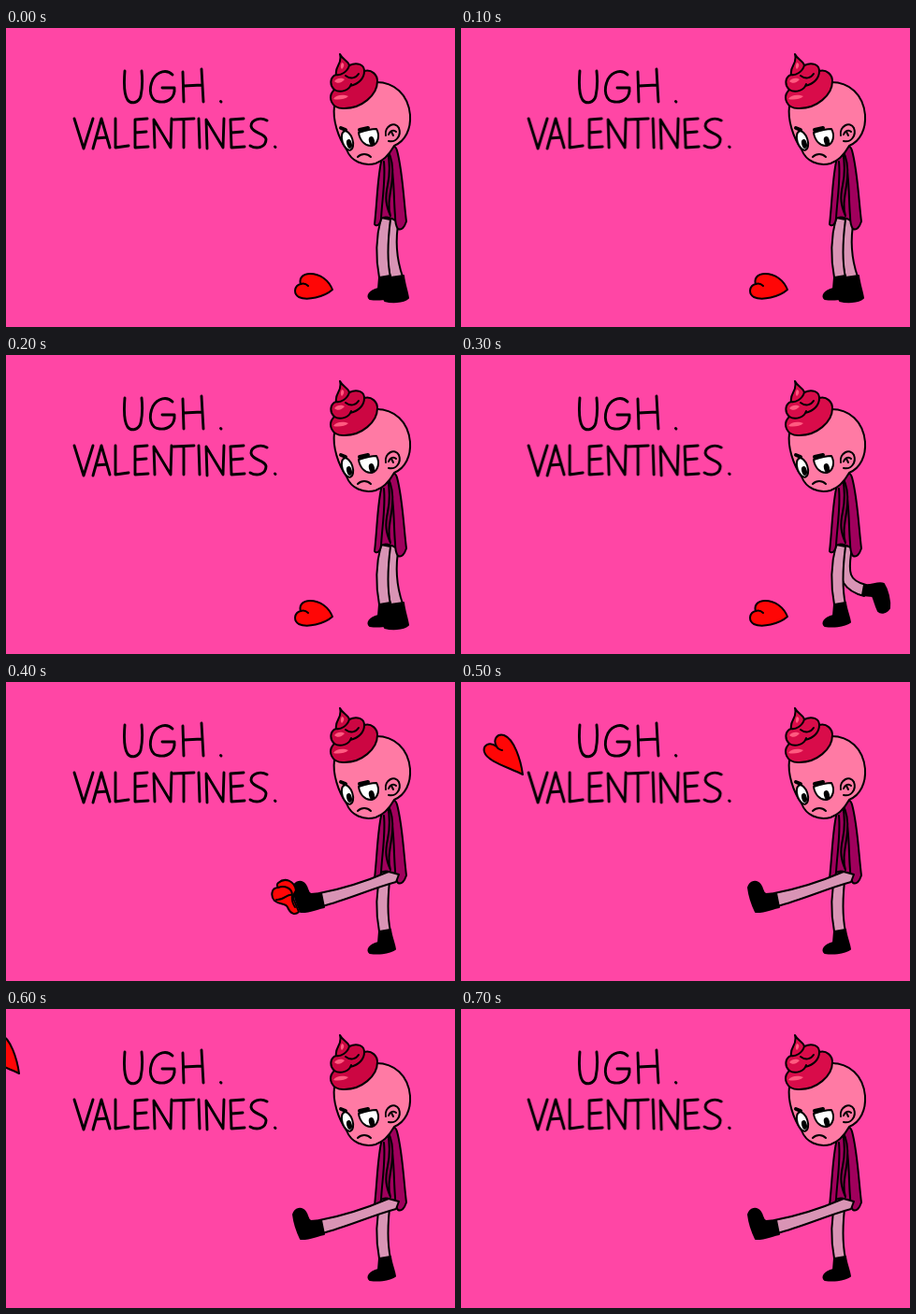
An HTML page that plays this animation: 480x320 px, repeating every 0.8 s.

```html
<!DOCTYPE html>
<html lang="en">
<head>
<meta charset="utf-8">
<title>Ugh. Valentines.</title>
<style>
html, body { margin: 0; width: 100%; height: 100%; overflow: hidden; background: #ff46a5; }
svg { display: block; width: 100vw; height: 100vh; }
path, ellipse { stroke: #000; stroke-width: 2; stroke-linecap: round; stroke-linejoin: round; }
.line { fill: none; }
.ink { fill: #000; }
.letters path { fill: none; stroke-width: 2.9; }
.skin { fill: #ff7aa4; }
.top { fill: #a0005c; }
.shade { fill: #82004a; }
.leg { fill: #d994b5; }
.heart { fill: #ff0606; }
.brow { fill: none; stroke-width: 4; }
.shine { fill: #ff5a80; stroke: none; }
.hair { fill: #cc0642; }

/* the drawing boils between two line variants */
#scene { filter: url(#boilA); animation: boil .2s step-end infinite; }
#word { animation: nudge .2s step-end infinite; }
.hair { animation: tint .2s step-end infinite; }
@keyframes boil { 50% { filter: url(#boilB); } }
@keyframes nudge { 50% { transform: translate(-.8px, 0); } }
@keyframes tint { 50% { fill: #d90c4a; } }

/* one kick: stand, swing back, strike, heart flies off */
.pose { animation: .8s step-end infinite; }
#stand { animation-name: stand; }
#swing { animation-name: swing; }
.kick { animation-name: kick; }
#rest { animation-name: rest; }
#hit { animation-name: hit; }
#fly { animation-name: fly; }
@keyframes stand { 0% { visibility: visible; } 37.5%, 100% { visibility: hidden; } }
@keyframes swing { 0%, 50%, 100% { visibility: hidden; } 37.5% { visibility: visible; } }
@keyframes kick { 0% { visibility: hidden; } 50%, 100% { visibility: visible; } }
@keyframes rest { 0% { visibility: visible; } 50%, 100% { visibility: hidden; } }
@keyframes hit { 0%, 62.5%, 100% { visibility: hidden; } 50% { visibility: visible; } }
@keyframes fly {
  0%, 87.5%, 100% { visibility: hidden; transform: none; }
  62.5% { visibility: visible; transform: none; }
  75% { visibility: visible; transform: translate(-52px, -30px); }
}
</style>
</head>
<body>
<svg viewBox="0 0 480 320" role="img" aria-label="Ugh. Valentines.">
  <defs>
    <filter id="boilA" filterUnits="userSpaceOnUse" x="0" y="0" width="480" height="320" color-interpolation-filters="sRGB">
      <feTurbulence type="fractalNoise" baseFrequency=".06" seed="3"/>
      <feDisplacementMap in="SourceGraphic" scale="1.2" xChannelSelector="R" yChannelSelector="G"/>
    </filter>
    <filter id="boilB" filterUnits="userSpaceOnUse" x="0" y="0" width="480" height="320" color-interpolation-filters="sRGB">
      <feTurbulence type="fractalNoise" baseFrequency=".06" seed="11"/>
      <feDisplacementMap in="SourceGraphic" scale="1.2" xChannelSelector="R" yChannelSelector="G"/>
    </filter>
    <g id="plant">
      <path class="leg" d="M401 203C396 222 395 246 399 267L411 267C407 248 408 228 411 205Z"/>
      <path class="ink" d="M399 267L411 265C412 273 415 279 416 286C409 291 396 291 389 290C385 287 389 281 398 279Z"/>
    </g>
  </defs>

  <rect width="480" height="320" fill="#ff46a5"/>

  <g id="scene">
    <g class="letters">
      <path d="M127 46C126 58 126 71 130 77C134 82 142 80 144 73C146 64 146 55 145 46"/>
      <path d="M178 50C172 44 162 46 157 55C152 66 154 78 164 79C174 80 181 74 180 64L167 64"/>
      <path d="M189 47L190 79M209 44L211 79M190 62L209 61"/>
      <path d="M229.5 78.5L230 79"/>
      <g id="word">
        <path d="M73 97L83 129L93 97"/>
        <path d="M93 129L102 97L111 128M96 118L108 117"/>
        <path d="M117 97L117 128L131 126"/>
        <path d="M151 97L138 98L138 128L152 127M138 112L150 111"/>
        <path d="M159 128L158 98L176 128L177 97"/>
        <path d="M179 98L201 97M190 98L190 128"/>
        <path d="M206 97L207 128"/>
        <path d="M215 129L214 98L232 128L233 97"/>
        <path d="M254 97L240 98L241 128L255 127M241 112L253 111"/>
        <path d="M279 99C272 95 262 98 262 105C263 113 277 112 278 119C278 128 268 130 261 126"/>
        <path d="M287.5 127L288 127.5"/>
      </g>
    </g>

    <g id="rest" class="pose">
      <path class="heart" d="M349 280C345 270 336 263 325 263C317 263 313 268 315 274C308 276 307 284 313 288C322 292 340 288 349 280Z"/>
      <path class="line" d="M315 274C318 273 321 274 323 276"/>
    </g>

    <g id="stand" class="pose">
      <path class="leg" d="M409 203C405 225 406 246 411 268L424 266C417 246 416 226 420 205Z"/>
      <use href="#plant"/>
      <path class="ink" d="M411 267L425 265C426 274 429 282 430 289C424 294 412 294 405 292C402 288 406 283 412 280Z"/>
    </g>

    <g id="swing" class="pose">
      <path class="leg" d="M407 204C405 220 404 234 409 244C414 252 423 256 431 258L433 246C425 244 419 241 417 235C414 226 417 215 418 205Z"/>
      <use href="#plant"/>
      <path class="ink" d="M431 246C438 248 446 242 452 245C456 251 459 263 458 271C455 276 449 277 446 274C443 268 442 262 440 258L429 257Z"/>
    </g>

    <use href="#plant" class="pose kick"/>

    <path class="top" d="M402 139C397 158 397 184 394 210C396 213 400 211 401 204C404 202 410 202 418 207C417 185 418 155 414 128Z"/>
    <path class="top" d="M408 130C408 124 416 124 418 131C424 153 425 183 428 207C426 213 423 217 419 215C416 211 416 206 416 201C414 180 416 155 408 130Z"/>
    <path class="shade" d="M408 131C413 140 414 148 413 160C412 175 407 188 411 201C406 190 405 182 408 168C411 154 410 142 408 131Z"/>
    <path class="line" d="M404 143C406 162 402 184 401 204"/>

    <g class="pose kick">
      <path class="leg" d="M335 226C362 221 388 212 409 203L420 206L417 214C391 221 365 233 338 240Z"/>
      <path class="ink" d="M337 226L340 241C331 243 322 247 315 246C311 238 308 228 307 220C309 213 316 212 320 217C323 221 322 226 326 227Z"/>
    </g>

    <path class="skin" d="M351 84C349 98 355 117 364 130C369 143 382 148 395 145C404 142 410 135 415 126C427 121 433 108 432 93C430 71 415 58 396 58C374 58 353 68 351 84Z"/>
    <path class="line" d="M406 115C404 105 416 99 420 107C423 115 417 123 409 121"/>
    <path class="line" d="M409 114C411 109 415 109 417 111M412 111L414 115"/>

    <ellipse cx="365" cy="120.5" rx="5.5" ry="10.5" fill="#fff" transform="rotate(-18 365 120.5)"/>
    <path fill="#fff" d="M377 112C383 110 390 108 396 108C400 115 398 124 391 126C384 127 378 120 377 112Z"/>
    <ellipse class="ink" cx="367" cy="124" rx="1.8" ry="4" transform="rotate(-14 367 124)"/>
    <ellipse class="ink" cx="391" cy="121" rx="2" ry="4" transform="rotate(-14 391 121)"/>
    <path class="brow" d="M358 107L363 109M378 109L387 107"/>
    <path class="line" d="M376 138C380 134 386 134 390 138"/>

    <path class="hair" d="M357 28C360 34 366 35 367 40C375 36 383 39 383 46C391 44 397 50 397 57C397 72 380 86 362 86C348 87 343 74 351 66C345 60 347 52 353 50C351 41 360 39 357 28Z"/>
    <path class="line" d="M353 50C358 51 365 47 367 40M351 66C357 70 367 67 369 60M383 46C383 54 377 60 368 62M363 51C368 55 374 54 377 49"/>
    <path class="shine" d="M350 76C353 71 361 71 366 73C362 77 354 77 350 76Z"/>
    <path class="shine" d="M351 57C354 53 359 53 362 55C359 59 354 60 351 57Z"/>
    <path class="shine" d="M359 37C362 38 362 41 359 44C357 42 358 39 359 37Z"/>

    <g id="hit" class="pose">
      <path class="heart" d="M310 223C308 212 298 209 291 215C289 217 290 219 291 220C283 220 283 230 287 234C293 239 299 236 301 241C304 248 309 250 313 246L309 236C306 231 307 227 310 223Z"/>
      <path class="line" d="M291 220C298 217 306 221 306 228C301 226 297 234 289 233M306 228C305 234 307 238 309 241"/>
    </g>

    <g id="fly" class="pose">
      <path class="heart" d="M66 99C64 84 57 61 46 57C38 55 34 62 38 69C30 63 23 68 25 75C28 85 50 91 66 99Z"/>
      <path class="line" d="M38 69C39 71 42 73 44 73"/>
    </g>
  </g>
</svg>
</body>
</html>
```
